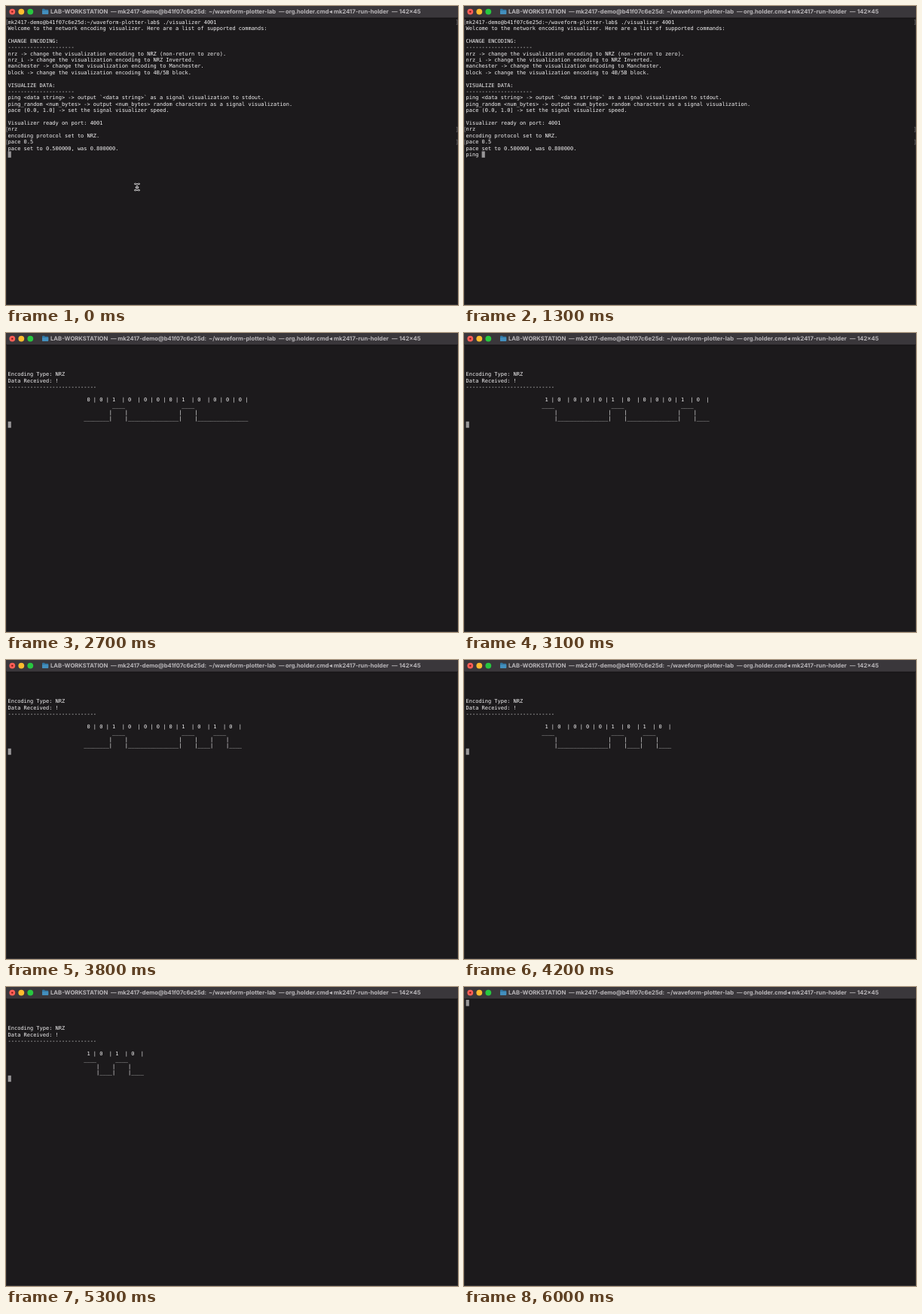
An HTML page for the animation above (6200 ms loop, 600 px wide and 398 px high).

```html
<!DOCTYPE html>
<html lang="en">
<head>
<meta charset="utf-8">
<title>Line encoding terminal</title>
<style>
  html, body { margin: 0; width: 100%; height: 100%; overflow: hidden; background: #1c1a1c; }
  svg { display: block; width: 600px; height: 398px; }
  text { white-space: pre; text-rendering: geometricPrecision; }
  #rows { font: 6.977px "DejaVu Sans Mono", monospace; fill: #f4f3f4; }
  #title { font: 700 7.7px Inter, sans-serif; fill: #b9b6b9; }
</style>
</head>
<body>
<svg viewBox="0 0 600 398" xmlns="http://www.w3.org/2000/svg">
  <rect width="600" height="398" fill="#1c1a1c"/>
  <rect width="600" height="16" fill="#3a373b"/>
  <rect y="15.6" width="600" height="0.8" fill="#0d0c0d"/>
  <path d="M.25 16V397.6H599.75V16" fill="none" stroke="#4b494b" stroke-width=".6"/>
  <circle cx="8.3" cy="7.6" r="3.9" fill="#ff5f57"/>
  <circle cx="8.3" cy="7.6" r="1.2" fill="#7d1510"/>
  <circle cx="20.3" cy="7.6" r="3.9" fill="#febc2e"/>
  <circle cx="32.3" cy="7.6" r="3.9" fill="#28c840"/>
  <path d="M48 4.6q0-.8.8-.8h2.2l.9.9h3.5q.8 0 .8.8v4.7q0 .8-.8.8h-6.6q-.8 0-.8-.8z" fill="#3177a3"/>
  <path d="M48 6.2h8.2v4q0 .8-.8.8h-6.6q-.8 0-.8-.8z" fill="#438fbd"/>
  <g id="title"></g>
  <path id="marks" fill="none" stroke="#8a888a" stroke-width=".6"/>
  <rect id="cursor" width="4.2" height="8.4" fill="#989698"/>
  <g id="rows"></g>
  <g id="mouse" fill="none" stroke-linecap="round">
    <path id="beam" d="M171.4 236.7q2.6 0 2.6 1.7q0-1.7 2.6-1.7M174 238.4V243.6M171.4 245.3q2.6 0 2.6-1.7q0 1.7 2.6 1.7M172.8 241.6h2.4" stroke="#d8d6d8" stroke-width="2"/>
    <use href="#beam"/>
    <path d="M171.6 236.7q2.4 0 2.4 1.7q0-1.7 2.4-1.7M174 238.4V243.6M171.6 245.3q2.4 0 2.4-1.7q0 1.7 2.4 1.7" stroke="#151315" stroke-width=".8"/>
  </g>
</svg>
<script>
const LOOP = 6200, COL = 4.2, ROW = 8.4, LEFT = 2.6, TOP = 17;
const $ = id => document.getElementById(id);

function addText(parent, x, y, str) {
  const el = document.createElementNS("http://www.w3.org/2000/svg", "text");
  el.setAttribute("x", x);
  el.setAttribute("y", y);
  el.textContent = str;
  return parent.appendChild(el);
}

[
  [59, "LAB-WORKSTATION"], [139, "—"], [148.3, "mk2417-demo@b41f07c6e25d:"],
  [269, "~/waveform-plotter-lab"], [362, "—"], [371, "org.holder.cmd"],
  [429, "◂"], [435, "mk2417-run-holder"], [512, "—"], [522, "142×45"]
].forEach(([x, str]) => addText($("title"), x, 10.3, str));

const rows = Array.from({ length: 22 }, (_, i) =>
  addText($("rows"), LEFT, TOP + ROW * i + 6.6, ""));

const intro = [
  "mk2417-demo@b41f07c6e25d:~/waveform-plotter-lab$ ./visualizer 4001",
  "Welcome to the network encoding visualizer. Here are a list of supported commands:",
  "",
  "CHANGE ENCODING:",
  "-".repeat(21),
  "nrz -> change the visualization encoding to NRZ (non-return to zero).",
  "nrz_i -> change the visualization encoding to NRZ Inverted.",
  "manchester -> change the visualization encoding to Manchester.",
  "block -> change the visualization encoding to 4B/5B block.",
  "",
  "VISUALIZE DATA:",
  "-".repeat(21),
  "ping <data string> -> output `<data string>` as a signal visualization to stdout.",
  "ping_random <num_bytes> -> output <num_bytes> random characters as a signal visualization.",
  "pace (0.0, 1.0] -> set the signal visualizer speed.",
  "",
  "Visualizer ready on port: 4001",
  "nrz",
  "encoding protocol set to NRZ.",
  "pace 0.5",
  "pace set to 0.500000, was 0.800000."
];

// Brackets around the lines where a command was entered
$("marks").setAttribute("d", [0, 17, 19].map(r => {
  const y = TOP + ROW * r + 1.6;
  return `M2.2 ${y}H1V${y + 6}H2.2M597.8 ${y}H599V${y + 6}H597.8`;
}).join(""));

const command = "ping !";
const keyTimes = [500, 600, 800, 900, 1100, 1400];

// The bytes "!" and newline, seen through a window of 12 bits
const stream = [0x21, 0x0a].map(b => b.toString(2).padStart(8, "0")).join("");
const WINDOW = 12, SENT = 2700, CLEARED = 6000;

function wave(bits) {
  const pad = " ".repeat(24);
  let label = pad, high = pad, mid = pad, low = pad;
  [...bits].forEach((b, i) => {
    const flip = i > 0 && b !== bits[i - 1];
    const gap = flip ? " " : "", edge = flip ? "|" : "";
    const on = b === "1";
    label += ` ${b} ${gap}|`;
    high += gap + (on ? "____" : "    ");
    mid += edge + "    ";
    low += edge + (on ? "    " : "____");
  });
  return [label, high, mid, low];
}

function screen(t) {
  if (t < SENT) {
    const typed = keyTimes.filter(k => t >= k).length;
    return { lines: [...intro, command.slice(0, typed)], row: 21, col: typed };
  }
  if (t >= CLEARED) return { lines: [], row: 0, col: 0 };
  // One bit leaves every 200 ms, with a single 100 ms hold
  const shift = Math.floor((t - (t < 3900 ? SENT : SENT + 100)) / 200);
  const lines = [
    "", "", "", "",
    "Encoding Type: NRZ",
    "Data Received: !",
    "-".repeat(28),
    "",
    ...wave(stream.slice(shift, shift + WINDOW))
  ];
  return { lines, row: 12, col: 0 };
}

function show(el, on) {
  el.setAttribute("visibility", on ? "visible" : "hidden");
}

function render(t) {
  const { lines, row, col } = screen(t);
  rows.forEach((el, i) => {
    const str = lines[i] || "";
    if (el.textContent !== str) el.textContent = str;
  });
  $("cursor").setAttribute("x", LEFT + COL * col);
  $("cursor").setAttribute("y", TOP + ROW * row);
  show($("marks"), t < SENT);
  show($("mouse"), t < keyTimes[0]);
}

const start = performance.now();
function tick() {
  render((performance.now() - start) % LOOP);
  requestAnimationFrame(tick);
}
render(0);
requestAnimationFrame(tick);
</script>
</body>
</html>
```
